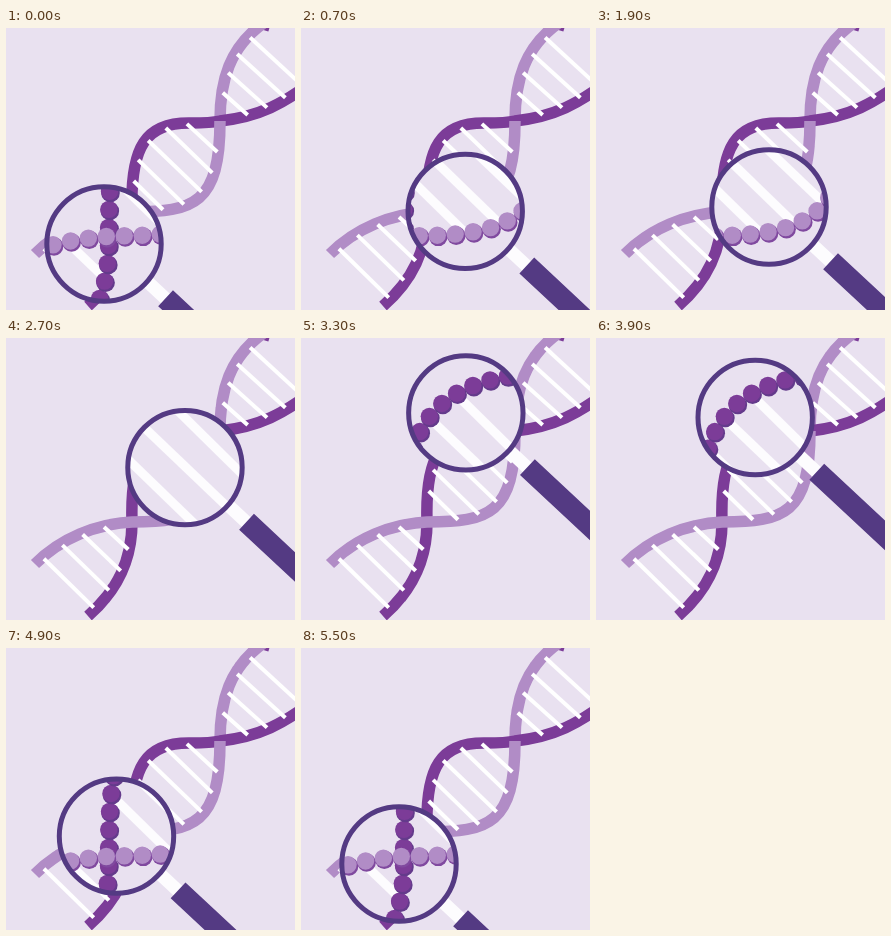
Animation, 289 px wide and 282 px high, one loop 5600 ms. Source, as an HTML page:

```html
<!DOCTYPE html>
<html lang="en">
<head>
<meta charset="utf-8">
<title>DNA under a magnifying glass</title>
<style>
  html, body { margin: 0; width: 100%; height: 100%; overflow: hidden; background: #e9e1f0; }
  svg { display: block; width: 100%; height: 100%; }
  .strand { fill: none; stroke-width: 11.5; }
  .light { stroke: #b18cc6; }
  .dark { stroke: #7c3c98; }
  .rungs { stroke: #fff; stroke-width: 4; }
  .wide { stroke: #fdfcfe; stroke-width: 9; }
</style>
</head>
<body>
<svg viewBox="0 0 289 282">
  <defs>
    <clipPath id="view"><circle id="hole" r="57.2"/></clipPath>
  </defs>
  <rect width="289" height="282" fill="#e9e1f0"/>
  <g id="helix"></g>
  <g class="rungs" id="rungs"></g>
  <g clip-path="url(#view)">
    <rect width="289" height="282" fill="#e9e1f0"/>
    <g class="wide" id="wide"></g>
    <g id="beads"></g>
  </g>
  <g id="glass">
    <g transform="rotate(43)">
      <rect x="58" y="-8.5" width="26" height="13" fill="#fdfcfe"/>
      <path d="M82 -13.2H202Q208 -13.2 208 -7V2.300Q208 8.500 202 8.500H82Z" fill="#543a83"/>
    </g>
    <circle r="57.2" fill="none" stroke="#543a83" stroke-width="5"/>
  </g>
</svg>
<script>
const $ = id => document.getElementById(id);

function make(tag, attrs, parent) {
  const el = document.createElementNS('http://www.w3.org/2000/svg', tag);
  for (const key in attrs) el.setAttribute(key, attrs[key]);
  if (parent) parent.appendChild(el);
  return el;
}

const curve = d => make('path', { d });

// Rungs join points at equal arc distance from where two curves meet or begin.
function rungs(group, dark, light, first, step, count) {
  const a = curve(dark), b = curve(light), inset = 0.03;
  for (let i = 0; i < count; i++) {
    const p = a.getPointAtLength(first + i * step);
    const q = b.getPointAtLength(first + i * step);
    const dx = (q.x - p.x) * inset, dy = (q.y - p.y) * inset;
    make('line', { x1: p.x + dx, y1: p.y + dy, x2: q.x - dx, y2: q.y - dy }, group);
  }
}

// Touching beads, each over a darker disc that shows as its shadow.
function chain(d, fill, shade) {
  const path = curve(d), gap = 18, length = path.getTotalLength();
  for (let s = 0; s < length; s += gap) {
    const { x, y } = path.getPointAtLength(s);
    make('circle', { cx: x + 0.6, cy: y + 1, r: 9.3, fill: shade }, $('beads'));
    make('circle', { cx: x - 0.4, cy: y - 0.6, r: 8.7, fill }, $('beads'));
  }
}

function strand(kind, d) {
  make('path', { class: 'strand ' + kind, d }, $('helix'));
}

// Helix: three stretches per strand, meeting at two crossings.
const LOW = 'M126 184', HIGH = 'M214 93';
const darkLow = 'M82 278', lightLow = 'M29 226';
const dark = [
  'C112 252 126 222 126 184',
  'C124 118 140 94 185 95C195 95 205 95 214 93',
  'C250 89 278 78 318 44'
];
const light = [
  'C55 200 90 186 126 184',
  'C188 184 214 176 214 93',
  'C214 55 222 18 262 -8'
];

strand('dark', 'M254 -5L264 -2');
strand('light', HIGH + light[2]);
strand('dark', darkLow + dark.join(''));
strand('light', lightLow + light[0] + light[1]);
rungs($('rungs'), darkLow + dark[0], lightLow + light[0], 10, 23, 4);
rungs($('rungs'), LOW + dark[1], LOW + light[1], 32, 22, 5);
rungs($('rungs'), HIGH + dark[2], HIGH + light[2], 29, 21, 4);

// Enlarged helix seen through the lens.
const CROSS = 'M103 209';
const bigDark = 'C103 115 108 50 224 36', bigLight = 'C150 206 242 216 246 125';
rungs($('wide'), CROSS + bigDark, CROSS + bigLight, 62, 36, 4);
rungs($('wide'), CROSS + 'C103 235 100 255 94 271', CROSS + 'C78 210 55 215 30 222', 42, 0, 1);
chain('M94 271C100 255 103 235 103 209' + bigDark, '#7c3c98', '#643a8b');
chain('M30 222C55 215 78 210 103 209' + bigLight, '#b18cc6', '#80499f');

const LOOP = 5600, STEP = 100;

function ease(t, from, to) {
  const u = Math.min(1, Math.max(0, (t - from) / (to - from)));
  return (1 - Math.cos(Math.PI * u)) / 2;
}

function lensAt(t) {
  const right = ease(t, 0, 900);
  const up = ease(t, 2000, 3480);
  const back = ease(t, 3620, 5420);
  return [
    98 + 75 * right + 32.5 * up - 42.5 * up * up - 65 * back,
    216 - 37 * right - 108 * up + 145 * back
  ];
}

function draw(t) {
  const move = `translate(${lensAt(t).join(' ')})`;
  $('hole').setAttribute('transform', move);
  $('glass').setAttribute('transform', move);
}

const start = performance.now();
function tick() {
  const t = (performance.now() - start) % LOOP;
  draw(Math.floor(t / STEP) * STEP);
  requestAnimationFrame(tick);
}
tick();
</script>
</body>
</html>
```
